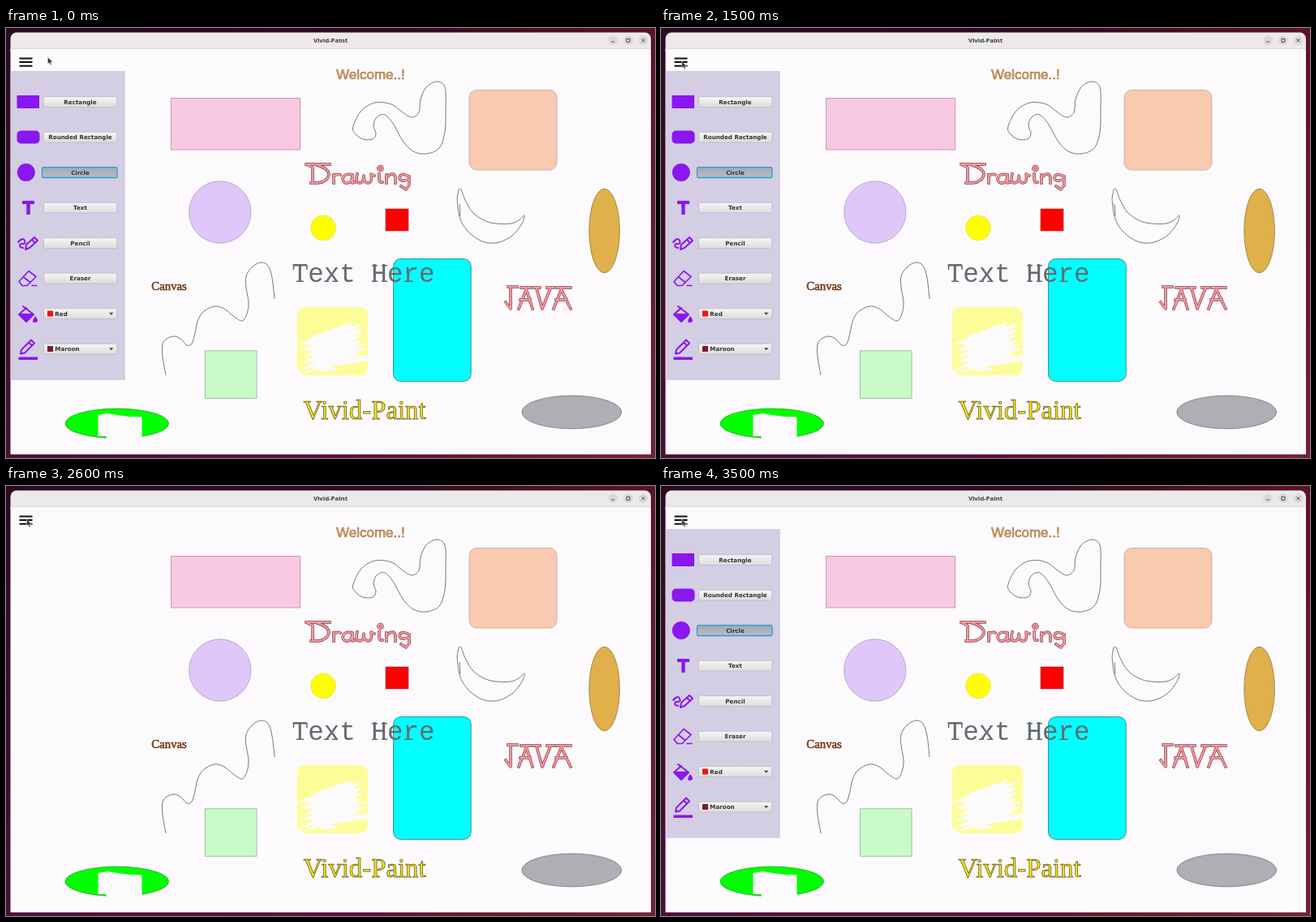
Recreate the animation shown at these times as an HTML page. Size 800 px wide and 530 px high, loop 3.6 s.

```html
<!DOCTYPE html>
<html lang="en">
<head>
<meta charset="utf-8">
<title>Vivid-Paint</title>
<style>
html, body { margin: 0; width: 100%; height: 100%; overflow: hidden; background: #35102d; }
svg { display: block; width: 800px; height: 530px; }
.ui { font: bold 7.15px "DejaVu Sans", sans-serif; fill: #333; }
.mid { text-anchor: middle; }
.title { font: bold 7.8px "Noto Sans", sans-serif; fill: #3a3a3a; }
.pencil { fill: none; stroke: #747c70; stroke-width: 1; stroke-linejoin: round; }
.icon { fill: none; stroke: #8a16f0; stroke-width: 2; stroke-linejoin: round; stroke-linecap: round; }
.solid { fill: #8a16f0; }
.letters { fill: none; stroke-linejoin: round; stroke-linecap: square; }
</style>
</head>
<body>
<svg viewBox="0 0 800 530">
  <defs>
    <linearGradient id="wall" x2="1" y2="0">
      <stop offset="0" stop-color="#2b0b24"/>
      <stop offset=".6" stop-color="#330a22"/>
      <stop offset="1" stop-color="#5d1230"/>
    </linearGradient>
    <linearGradient id="floor" x2="1" y2="0">
      <stop offset="0" stop-color="#4c0f36"/>
      <stop offset=".5" stop-color="#5b1138"/>
      <stop offset="1" stop-color="#742038"/>
    </linearGradient>
    <linearGradient id="fade" x2="0" y2="1">
      <stop offset="0" stop-color="#000"/>
      <stop offset="1" stop-color="#fff"/>
    </linearGradient>
    <mask id="lower"><rect width="800" height="530" fill="url(#fade)"/></mask>
    <linearGradient id="btn" x2="0" y2="1">
      <stop offset="0" stop-color="#f6f6f6"/>
      <stop offset="1" stop-color="#dcdcdc"/>
    </linearGradient>
    <linearGradient id="down" x2="0" y2="1">
      <stop offset="0" stop-color="#a6a6b2"/>
      <stop offset="1" stop-color="#bcbcc6"/>
    </linearGradient>
    <linearGradient id="shade" x2="1" y2="0">
      <stop offset="0" stop-color="#bdb9cb"/>
      <stop offset="1" stop-color="#fcfafd" stop-opacity="0"/>
    </linearGradient>
    <clipPath id="inside"><path d="M5.5 26H795V525H5.5z"/></clipPath>
  </defs>

  <rect width="800" height="530" fill="url(#wall)"/>
  <rect width="800" height="530" fill="url(#floor)" mask="url(#lower)"/>
  <rect x="5.5" y="5.5" width="789.5" height="30" rx="7.5" fill="#ebe9e9"/>
  <path d="M5.5 26H795V525.5H5.5z" fill="#fcfafd"/>
  <path d="M5.5 25.5H795" stroke="#dad7d8" stroke-width=".8"/>
  <text x="400" y="18.3" class="title mid">Vivid-Paint</text>
  <g fill="#dbd8d7">
    <circle cx="748" cy="15.3" r="5.7"/><circle cx="767" cy="15.3" r="5.7"/><circle cx="785.5" cy="15.3" r="5.7"/>
  </g>
  <path d="M746 17h4M765 13.3h4v4h-4zM783.5 13.3l4 4m0-4l-4 4" fill="none" stroke="#3a3a3a" stroke-width=".9"/>

  <rect x="203.5" y="86.5" width="159" height="63.5" fill="#f7c9e3" stroke="#d48a9c" stroke-width=".9"/>
  <rect x="571" y="76.5" width="108" height="98.5" rx="9" fill="#f9c9b0" stroke="#bea99c" stroke-width=".8"/>
  <circle cx="263.8" cy="227" r="38.2" fill="#dfc7fa" stroke="#a79fb3" stroke-width=".8"/>
  <circle cx="391" cy="246.3" r="15.4" fill="#ff0" stroke="#c9c93c" stroke-width=".4"/>
  <rect x="468" y="223" width="28" height="27" fill="#f00" stroke="#a22" stroke-width=".6"/>
  <ellipse cx="737.6" cy="250" rx="18.8" ry="51.8" fill="#e0b04a" stroke="#8f7a48" stroke-width=".8"/>
  <rect x="477.5" y="284.5" width="95.7" height="151" rx="9" fill="#0ff" stroke="#287878" stroke-width=".8"/>
  <rect x="359" y="344" width="87" height="84" rx="9" fill="#fdfd98"/>
  <path fill="#fcfafd" d="M361 389L382 380 374 381 402 371 428 362 424 368 441 364 428 373 441 372 430 379 440 378 427 386 439 385 432 391 447 388 431 396 446 395 430 402 440 402 421 408 447 403V410L420 414 400 418 412 421 384 424 395 418 366 426 382 417 359 423 381 411 361 413 384 403 365 406 379 398 362 398 378 391z"/>
  <path fill="#fcfafd" d="M359 428l3-7 3 5z"/>
  <rect x="245.5" y="397.8" width="63.5" height="58.5" fill="#c9fbc9" stroke="#98b898" stroke-width=".9"/>
  <ellipse cx="136.8" cy="487.4" rx="63.8" ry="18.3" fill="#0f0" stroke="#259425" stroke-width=".7"/>
  <path d="M113.5 477l12-2 8 1.500 18 2.500 16 .5v24l-1 4h-43v-4.500h-10z" fill="#fcfafd"/>
  <ellipse cx="697.3" cy="473.5" rx="61.4" ry="20.4" fill="#b0aeb2" stroke="#77757a" stroke-width=".8"/>

  <g id="lines" class="pencil"></g>

  <g stroke-linejoin="round">
    <text x="407" y="62.5" style="font:17px 'Liberation Sans',Arial,sans-serif" fill="#f0a04c" stroke="#8d6a44" stroke-width=".55">Welcome..!</text>
    <text x="179.3" y="322.5" style="font:14.8px 'Liberation Serif',serif" fill="#9a4710" stroke="#5e2c10" stroke-width=".55">Canvas</text>
    <text x="366.5" y="482" style="font:32.8px 'Liberation Serif',serif" fill="#ffe600" stroke="#5d5524" stroke-width=".75">Vivid-Paint</text>
  </g>
  <text x="352.6" y="313" style="font:32.6px 'Liberation Mono',monospace" fill="#626c6e">Text Here</text>
  <path d="M354.5 292v6M371 292v6M358 312.3h9M392 312.3h6m4 0h7M451 292.7h7m5 0h7M451 312.3h7m5 0h7M491 312.3h11" stroke="#626c6e" stroke-width="1.5"/>
  <g id="deco"></g>

  <g clip-path="url(#inside)">
    <rect id="tray" x="5.5" y="53" width="139.5" height="380.5" fill="#f0eff1"/>
    <g id="panel"></g>
  </g>
  <path d="M16.5 37.5h16M16.5 42h16M16.5 46.7h16" stroke="#111" stroke-width="2"/>
  <path id="cursor" d="M0 0V8.2L1.9 6.5 3.3 9.5 4.7 8.9 3.4 6H6z" fill="#35333a" stroke="#e3e1e6" stroke-width=".5"/>
</svg>
<script>
const $ = id => document.getElementById(id);

// Smooth curve through points
function curve(list, closed) {
  const pts = list.split(' ').map(p => p.split(',').map(Number));
  const n = pts.length;
  const at = i => closed ? pts[(i + n) % n] : pts[Math.max(0, Math.min(n - 1, i))];
  let d = 'M' + pts[0];
  for (let i = 0; i < (closed ? n : n - 1); i++) {
    const [a, b, c, e] = [at(i - 1), at(i), at(i + 1), at(i + 2)];
    d += `C${b.map((v, k) => v + (c[k] - a[k]) / 6)} ${c.map((v, k) => v - (e[k] - b[k]) / 6)} ${c}`;
  }
  return `<path d="${d}"/>`;
}

$('lines').innerHTML =
  curve('428,121 438,102 455,92 475,94 489,104 500,110 509,104 511,88 518,73 531,66 541,73 542,100 541,128 534,148 518,155 502,152 489,139 478,119 467,107 457,110 453,120 456,130 452,137 440,137 430,130', true) +
  curve('558,199 561,199 566,212 575,227 589,237 604,241 622,241 632,237 639,231 636,241 625,255 608,264 590,264 574,255 563,242 558,228 556,210') +
  '<path d="M556 210L558 199M559 217l1 15"/>' +
  curve('197,428 193,405 193,390 198,383 207,380 215,383 223,391 229,389 233,376 236,362 243,350 257,343 269,346 280,355 291,361 297,352 299,338 296,320 296,306 303,295 314,289 323,293 328,308 331,334');

// Decorative words as outlined strokes
function word(label, d) {
  const layer = (color, width) => `<path d="${d}" stroke="${color}" stroke-width="${width}"/>`;
  return `<g class="letters" role="img" aria-label="${label}">${layer('#80404a', 3.5)}${layer('#ff959d', 2.1)}</g>`;
}
$('deco').innerHTML =
  word('Drawing', 'M370 168H399M372 169L378 172V191M384 169Q398 173 398 181Q396 190 384 191H376' +
    'M404 181V191M404 183Q408 179 412 181M427 181Q417 178 415 186Q416 192 421 191Q427 190 427 181V191L430 190' +
    'M433 180Q430 191 436 191Q441 191 441 182Q441 191 446 191Q452 191 450 180L454 182' +
    'M460 180V187Q460 191 464 190M459 173a2.5 2.5 0 1 0 5 0a2.5 2.5 0 1 0 -5 0' +
    'M469 181V191M469 184Q478 176 480 184V191M497 183Q486 177 485 185Q487 191 497 186V194L493 199L487 195') +
  word('JAVA', 'M619 319H630M622 321V346L616 338M635 320H647M642 321L632 346M641 321L649 346M634 335H646' +
    'M651 320H658M654 321L661 346L671 321M667 320H675M679 320H696M685 321L675 346M684 321L696 346M678 335H691');

// Tool panel
const tools = ['Rectangle', 'Rounded Rectangle', 'Circle', 'Text', 'Pencil', 'Eraser', 'Red', 'Maroon'];
const swatches = { Red: '#f01414', Maroon: '#7c1c2c' };
const icons = [
  '<rect class="solid" x="13.5" y="-8" width="27.5" height="16"/>',
  '<rect class="solid" x="13.5" y="-8" width="28" height="16" rx="5"/>',
  '<circle class="solid" cx="24.8" r="11"/>',
  '<path class="solid" d="M20 -8.5H35V-4.5H29.7V8.5H25.3V-4.5H20z"/>',
  '<path class="icon" d="M15-1q6-7 8-2t-5 4q-3 4 3 5M24 8l1-6 10-9 4 4-10 9zM32-4l4 4"/>',
  '<path class="icon" style="stroke-width:1.6" d="M16 4L28-9 37-2 26 9H20zM21-2l9 7M32 9h6"/>',
  '<path class="icon" d="M21-9l13 10-9 9-9-9 9-8"/><path class="solid" d="M16 0h18l-9 10zM36 3q6 7 0 8t0-8z"/>',
  '<path class="icon" d="M18 6l1-5 12-12 4 4-12 12zM28-8l4 4"/><path class="solid" d="M15.5 10h23.5v3.5h-23.5z"/>'
];
function row(name, i) {
  const on = name === 'Circle', color = swatches[name];
  const box = `<rect x="${on ? 44.5 : 46.5}" y="-6.3" width="${on ? 92.5 : 90.3}" height="12.8" rx="1.5"
    fill="url(#${on ? 'down' : 'btn'})" stroke="${on ? '#279fd0' : '#bbb9c2'}" stroke-width="${on ? 1.3 : .8}"/>`;
  const label = color
    ? `<rect x="51" y="-3.5" width="7" height="7" fill="${color}"/><text class="ui" x="60.3" y="2.7">${name}</text>
       <path d="M127-1.3h5.4l-2.7 3z" fill="#444"/>`
    : `<text class="ui mid" x="91.5" y="2.7">${name}</text>`;
  return `<g transform="translate(0 ${91 + i * 43.5})">${icons[i]}${box}${label}</g>`;
}
$('panel').innerHTML = `<rect x="5.5" y="53" width="140.5" height="381" fill="#d3cee3"/>
  <rect x="145" y="53" width="3.5" height="381" fill="url(#shade)"/>` + tools.map(row).join('');

// [time, x, y]
const pointer = [[0, 51.5, 36], [100, 51.5, 36], [600, 30.5, 40.5], [800, 30.5, 40.5], [1200, 25.5, 41], [3600, 25.5, 41]];
const slide = { 2700: -128, 2800: -75, 2900: -20 };

function draw(now) {
  const t = Math.floor(now % 3600 / 100) * 100;
  const k = pointer.findIndex(p => p[0] > t);
  const [a, b] = [pointer[k - 1], pointer[k]];
  const f = (t - a[0]) / (b[0] - a[0]);
  $('cursor').setAttribute('transform', `translate(${a[1] + (b[1] - a[1]) * f} ${a[2] + (b[2] - a[2]) * f})`);
  const hidden = t >= 1600 && t < 2700;
  $('panel').style.display = hidden ? 'none' : '';
  $('panel').setAttribute('transform', `translate(${slide[t] || 0} 0)`);
  $('tray').style.display = t in slide ? '' : 'none';
}
const start = performance.now();
function tick() {
  draw(performance.now() - start);
  requestAnimationFrame(tick);
}
tick();
</script>
</body>
</html>
```
